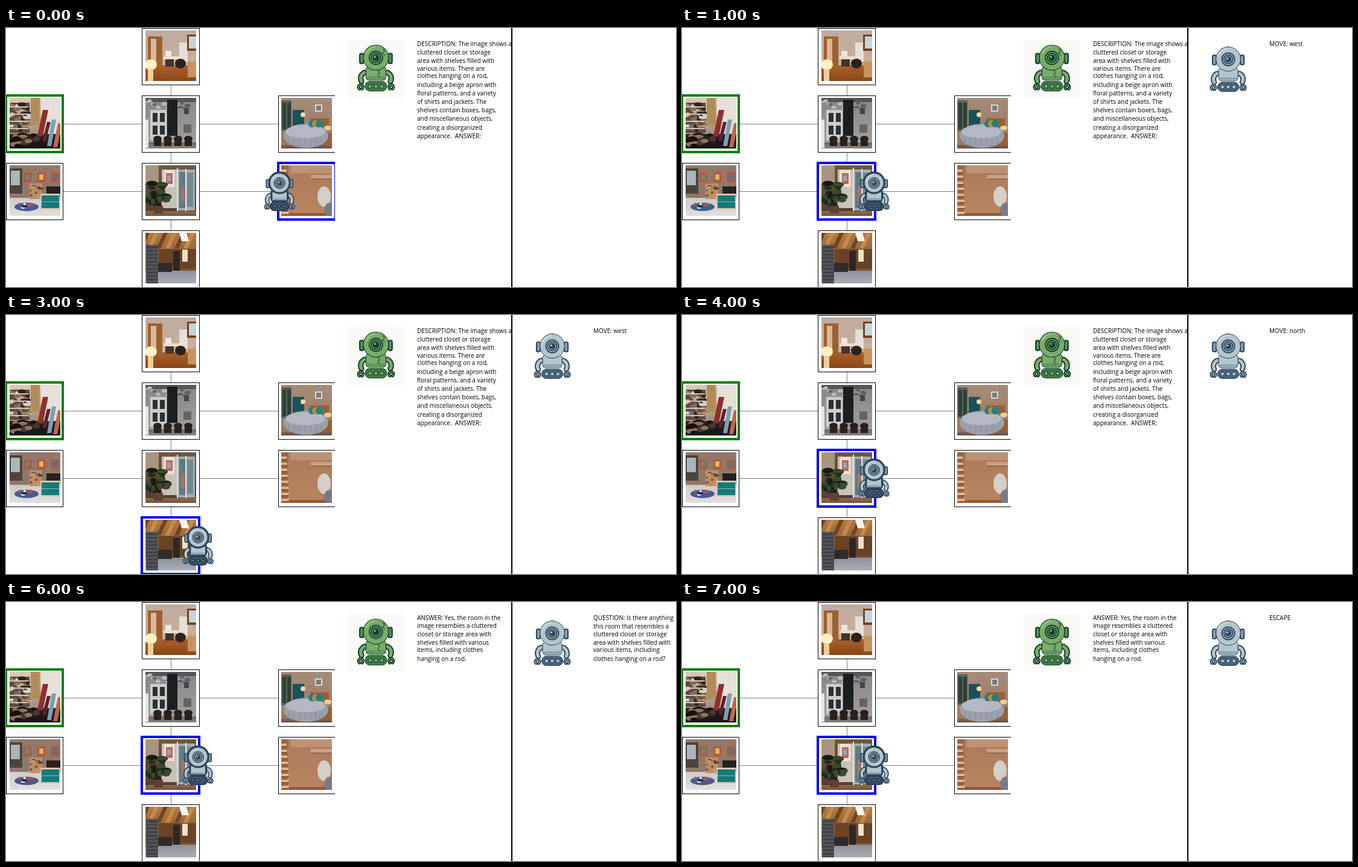
Animation, 1110 px wide and 430 px high, one loop 8 s. Source, as an HTML page with a canvas:

```html
<!DOCTYPE html>
<html lang="en">
<head>
<meta charset="utf-8">
<title>Room graph dialogue</title>
<style>
html, body { margin: 0; width: 100%; height: 100%; overflow: hidden; background: #fff; }
canvas { display: block; }
</style>
</head>
<body>
<canvas id="stage" width="1110" height="430"></canvas>
<script>
const ctx = document.getElementById('stage').getContext('2d');
const STEP = 1000;
const BLUE = { line: '#2d455a', fill: '#b3c6ce', mid: '#8ba3b1', tread: '#4a6278', glow: '#d3e0e6' };
const GREEN = { line: '#123f2c', fill: '#7bab69', mid: '#5f9558', tread: '#3f7848', glow: '#a5cf92' };

const DESCRIPTION = `DESCRIPTION: The image shows a
cluttered closet or storage
area with shelves filled with
various items. There are
clothes hanging on a rod,
including a beige apron with
floral patterns, and a variety
of shirts and jackets. The
shelves contain boxes, bags,
and miscellaneous objects,
creating a disorganized
appearance.  ANSWER:`;
const ANSWER = `ANSWER: Yes, the room in the
image resembles a cluttered
closet or storage area with
shelves filled with various
items, including clothes
hanging on a rod.`;
const QUESTION = `QUESTION: Is there anything
this room that resembles a
cluttered closet or storage
area with shelves filled with
various items, including
clothes hanging on a rod?`;

// column and row of the agent, left text, right text
const STEPS = [
  [2, 2, DESCRIPTION, ''],
  [1, 2, DESCRIPTION, 'MOVE: west'],
  [1, 3, DESCRIPTION, 'MOVE: south'],
  [1, 3, DESCRIPTION, 'MOVE: west'],
  [1, 2, DESCRIPTION, 'MOVE: north'],
  [1, 2, DESCRIPTION, QUESTION],
  [1, 2, ANSWER, QUESTION],
  [1, 2, ANSWER, 'ESCAPE']
];

function rect(c, x, y, w, h) {
  ctx.fillStyle = c;
  ctx.fillRect(x, y, w, h);
}
function oval(c, x, y, rx, ry = rx) {
  ctx.fillStyle = c;
  ctx.beginPath();
  ctx.ellipse(x, y, rx, ry, 0, 0, 7);
  ctx.fill();
}
function fade(top, bottom, y = 0) {
  const g = ctx.createLinearGradient(0, y, 0, 84);
  g.addColorStop(0, top);
  g.addColorStop(1, bottom);
  rect(g, 0, y, 84, 84 - y);
}
// vertical strip whose foot is shifted sideways
function slant(c, x, y, w, h, dx) {
  ctx.fillStyle = c;
  ctx.beginPath();
  ctx.moveTo(x, y);
  ctx.lineTo(x + w, y);
  ctx.lineTo(x + w + dx, y + h);
  ctx.lineTo(x + dx, y + h);
  ctx.fill();
}
function repeat(n, fn) {
  for (let i = 0; i < n; i++) fn(i);
}
// seeded blobs inside a box
function clutter(seed, colors, n, x, y, w, h, r) {
  const rnd = () => (seed = seed * 16807 % 2147483647) / 2147483647;
  repeat(n, i => oval(colors[i % colors.length], x + rnd() * w, y + rnd() * h, r * (0.5 + rnd()), r * (0.3 + rnd() * 0.5)));
}

function closet() {
  fade('#dccbb5', '#8d7565');
  rect('#5f4a3c', 0, 8, 33, 50);
  clutter(11, ['#e0d5c6', '#2b2320', '#a9835f', '#77706c'], 40, 0, 10, 33, 46, 5);
  repeat(4, i => rect('#d2c4b2', 0, 14 + i * 12, 32, 2));
  rect('#e6dfda', 52, 0, 32, 84);
  fade('#2b2422', '#161313', 60);
  clutter(5, ['#8d735c', '#15110f', '#463832'], 18, 0, 60, 60, 22, 6);
  rect('#b28c58', 35, 0, 15, 45);
  slant('#8e302c', 55, 20, 9, 44, -9);
  slant('#5c2430', 62, 40, 6, 32, -8);
  slant('#7da0b1', 70, 36, 7, 44, -8);
  slant('#c0674a', 80, 42, 7, 40, -8);
}
function studio() {
  fade('#92796b', '#8d7568', 0);
  rect('#4c433b', 0, 5, 21, 42);
  rect('#a9b7ba', 2, 9, 15, 24);
  fade('#cfcaca', '#e2dfdf', 54);
  repeat(3, i => {
    rect('#b9543a', 23 + i * 23, 12, 13, 16);
    rect(['#55927b', '#dfb857', '#477d91'][i], 26 + i * 23, 15, 7, 9);
  });
  rect('#bc8e64', 33, 30, 21, 26);
  clutter(3, ['#7d573d', '#d3ab7d', '#5a4032'], 12, 35, 34, 17, 20, 3);
  rect('#28201f', 61, 35, 23, 12);
  slant('#d6c6ad', 51, 47, 32, 26, 0);
  rect('#147b7a', 53, 50, 29, 21);
  rect('#85bbb5', 53, 60, 29, 1);
  oval('#435d93', 28, 69, 20, 7);
  clutter(8, ['#c2503f', '#eee9df', '#29314e'], 7, 16, 64, 24, 8, 4);
}
function office() {
  fade('#c0aca2', '#cfae90');
  fade('#a9602a', '#8b4718', 58);
  rect('#9c6130', 4, 10, 24, 50);
  rect('#d9b99a', 9, 14, 9, 40);
  rect('#e6dfda', 56, 20, 14, 32);
  rect('#704526', 69, 7, 15, 27);
  rect('#c3d4df', 72, 10, 12, 20);
  rect('#eadfd2', 30, 43, 30, 5);
  rect('#eee7df', 33, 34, 10, 9);
  oval('#2c211d', 58, 55, 9, 8);
  rect('#43332c', 33, 48, 14, 12);
  rect('#c7935f', 70, 52, 14, 26);
  oval('#fff0c8', 9, 57, 10, 9);
  rect('#efcf98', 4, 64, 9, 20);
}
function hall() {
  fade('#84868a', '#a5a19e');
  rect('#55565a', 0, 0, 84, 7);
  clutter(9, ['#b9b9b9', '#5d5e60'], 14, 4, 4, 76, 14, 4);
  rect('#cfccc8', 8, 20, 27, 50);
  repeat(4, i => rect('#2b3033', 12 + i % 2 * 12, 25 + (i >> 1) * 21, 8, 15));
  rect('#1b1f22', 36, 3, 17, 60);
  rect('#464543', 64, 17, 8, 10);
  rect('#6a635d', 63, 44, 13, 14);
  fade('#6c6562', '#8d8580', 74);
  rect('#e5e5e2', 0, 36, 5, 47);
  repeat(4, i => {
    oval('#27211f', 20 + i * 17, 68, 7, 5);
    rect('#27211f', 14 + i * 17, 71, 12, 9);
  });
}
function shower() {
  fade('#6d5644', '#553d2d');
  rect('#a8957f', 0, 0, 22, 30);
  slant('#c8c2b8', 27, 7, 26, 64, 0);
  rect('#ece4d9', 31, 8, 17, 28);
  rect('#c0665c', 34, 13, 11, 18);
  rect('#91a7b8', 36, 17, 6, 9);
  rect('#a3b0b2', 53, 7, 29, 68);
  rect('#5f7a82', 56, 11, 10, 60);
  rect('#a9706c', 59, 35, 6, 25);
  rect('#74898c', 69, 12, 10, 57);
  rect('#e3e2da', 52, 4, 2, 74);
  rect('#e3e2da', 66, 6, 2, 71);
  fade('#8f6c50', '#765037', 76);
  clutter(21, ['#232e1c', '#3d492d', '#161d13'], 30, 4, 30, 30, 36, 7);
  rect('#604130', 14, 67, 15, 13);
}
function cabin() {
  fade('#b17a42', '#6b452b');
  repeat(6, i => slant(i % 2 ? '#c48b4b' : '#70441f', i * 15, 0, 7, 26, -12));
  slant('#f2f5f5', 56, 0, 12, 14, 4);
  rect('#6a4327', 22, 27, 62, 33);
  rect('#2f2723', 46, 30, 11, 34);
  rect('#efe0c8', 61, 28, 9, 20);
  fade('#8d939a', '#a9afb5', 63);
  rect('#2e2b2a', 20, 50, 24, 15);
  rect('#515359', 1, 20, 20, 64);
  repeat(11, i => rect('#3a3c42', 2, 23 + i * 6, 18, 2));
}
function bedroom() {
  fade('#a68b7a', '#9c755e');
  rect('#5b625b', 0, 4, 17, 51);
  repeat(2, i => rect('#2d4236', 2 + i * 8, 8, 6, 44));
  rect('#17535a', 19, 20, 19, 30);
  rect('#e0d7cb', 56, 11, 12, 12);
  rect('#747d86', 58, 13, 8, 8);
  rect('#98612f', 48, 34, 31, 20);
  oval('#f4d9a4', 36, 28, 4);
  rect('#9a5f33', 68, 58, 16, 26);
  oval('#ead09b', 77, 50, 6, 4);
  fade('#7e6254', '#6b4f42', 78);
  oval('#9aa0ac', 41, 63, 37, 20);
  oval('#b3b8c2', 40, 56, 33, 11);
  repeat(7, i => rect('#858c99', 12 + i * 9, 66, 1, 13));
  repeat(3, i => oval(i === 1 ? '#d2813b' : '#15848c', 51 + i * 6, 43, 6, 6));
}
function stairs() {
  fade('#ab7a5d', '#b9845f');
  rect('#bd9174', 15, 0, 69, 13);
  rect('#986549', 0, 0, 11, 84);
  repeat(8, i => {
    rect('#e3b789', 0, 7 + i * 10, 9 + i * 0.6, 4);
    rect('#8b5536', 0, 11 + i * 10, 9 + i * 0.6, 2);
  });
  slant('#c9a084', 49, 16, 35, 6, 0);
  rect('#8b5b43', 50, 22, 34, 1.5);
  rect('#935a35', 12, 79, 72, 5);
  oval('#d4cfca', 71, 52, 11, 17);
  oval('#777a87', 80, 74, 9, 12);
}

const ROOMS = [[1, 0, office], [0, 1, closet], [1, 1, hall], [2, 1, bedroom],
  [0, 2, studio], [1, 2, shower], [2, 2, stairs], [1, 3, cabin]];

function pill(c, line, x, y, w, h, r) {
  ctx.beginPath();
  ctx.roundRect(x, y, w, h, r);
  ctx.fillStyle = c;
  ctx.fill();
  ctx.strokeStyle = line;
  ctx.stroke();
}
function disc(c, line, x, y, r) {
  pill(c, line, x - r, y - r, 2 * r, 2 * r, r);
}
function arc(c, w, x, y, r, from, to) {
  ctx.strokeStyle = c;
  ctx.lineWidth = w;
  ctx.beginPath();
  ctx.arc(x, y, r, from, to);
  ctx.stroke();
}

// drawn in a 60 by 77 cell
function robot(x, y, s, k, worn) {
  ctx.save();
  ctx.translate(x + 30 * s, y);
  ctx.scale(s, s);
  ctx.lineCap = ctx.lineJoin = 'round';
  for (const side of [-1, 1]) {
    ctx.save();
    ctx.scale(side, 1);
    for (const [c, w] of [[k.line, 5], [k.mid, 1.6]]) arc(c, w, 24.5, 69, 3.6, 2.2, 7.2);
    for (const [c, w] of [[k.line, 9], [k.fill, 5]]) arc(c, w, 14, 55, 10.5, -1.1, 0.5);
    ctx.lineWidth = 2.2;
    pill(k.mid, k.line, 20, 15, 6, 16, 2.5);
    ctx.restore();
  }
  pill(k.fill, k.line, -16, 36, 32, 22, 5);
  rect(k.mid, -14.5, 52, 29, 4);
  pill(k.tread, k.line, -17.5, 60, 35, 15.5, 7.5);
  for (const wx of [-9.5, 0, 9.5]) disc(k.fill, k.line, wx, 67.8, 3);
  disc(k.fill, k.line, 0, 21.5, 20.3);
  arc(k.glow, 1.5, 0, 21.5, 17, 3.5, 4.6);
  ctx.lineWidth = 2;
  disc(k.glow, k.line, 0, 22, 10.5);
  disc(k.mid, k.line, 0, 22, 7.5);
  oval(k.line, 0, 22, 5);
  oval(k.glow, -1.6, 20.4, 1.5);
  if (worn) {
    ctx.lineWidth = 1;
    for (const [a, b] of [[11, 7], [3, 42]]) {
      ctx.beginPath();
      repeat(4, i => ctx.lineTo(a + i % 2 * 3, b + i * 3.5));
      ctx.stroke();
    }
  }
  ctx.restore();
}

function frame(col, row, color, width, fill) {
  const half = width % 2 / 2, x = Math.floor(225.5 * col), w = 94 + 226 * col - x;
  if (fill) rect(fill, x, row * 112, w, 94);
  ctx.strokeStyle = color;
  ctx.lineWidth = width;
  ctx.strokeRect(x + half, row * 112 + half, w, 94);
}

function map(col, row) {
  ctx.save();
  ctx.beginPath();
  ctx.rect(0, 0, 545, 430);
  ctx.clip();
  for (const y of [159, 271]) rect('#808080', 48, y, 452, 1);
  rect('#808080', 273, 48, 1, 334);
  for (const [c, r, paint] of ROOMS) {
    frame(c, r, '#000', 1, '#fff');
    ctx.save();
    ctx.translate(6 + 225 * c, 4 + 112 * r);
    ctx.beginPath();
    ctx.rect(0, 0, 84, 84);
    ctx.clip();
    paint();
    ctx.restore();
  }
  frame(0, 1, '#008000', 4);
  frame(col, row, '#0000ff', 4);
  robot(158 + 135 * col, 15 + 112 * row, 0.84, BLUE);
  ctx.restore();
}

// lines with descenders take more height
function write(text, x) {
  let y = 30;
  ctx.fillStyle = '#000';
  ctx.font = '10px "Open Sans", sans-serif';
  for (const line of text.split('\n')) {
    ctx.fillText(line, x, Math.round(y));
    y += /[gjpqy]/.test(line) ? 14.2 : 12.5;
  }
}

function draw(step) {
  const [col, row, left, right] = STEPS[step];
  rect('#fff', 0, 0, 1110, 430);
  map(col, row);
  rect('#fafbf6', 565, 20, 96, 96);
  robot(582, 27, 1.03, GREEN, true);
  write(left, 681);
  rect('#000', 837, 0, 2, 430);
  if (right) {
    robot(875, 30, 1, BLUE);
    write(right, 973);
  }
}

const start = performance.now();
function tick() {
  draw(Math.floor((performance.now() - start) / STEP) % STEPS.length);
  requestAnimationFrame(tick);
}
tick();
</script>
</body>
</html>
```
